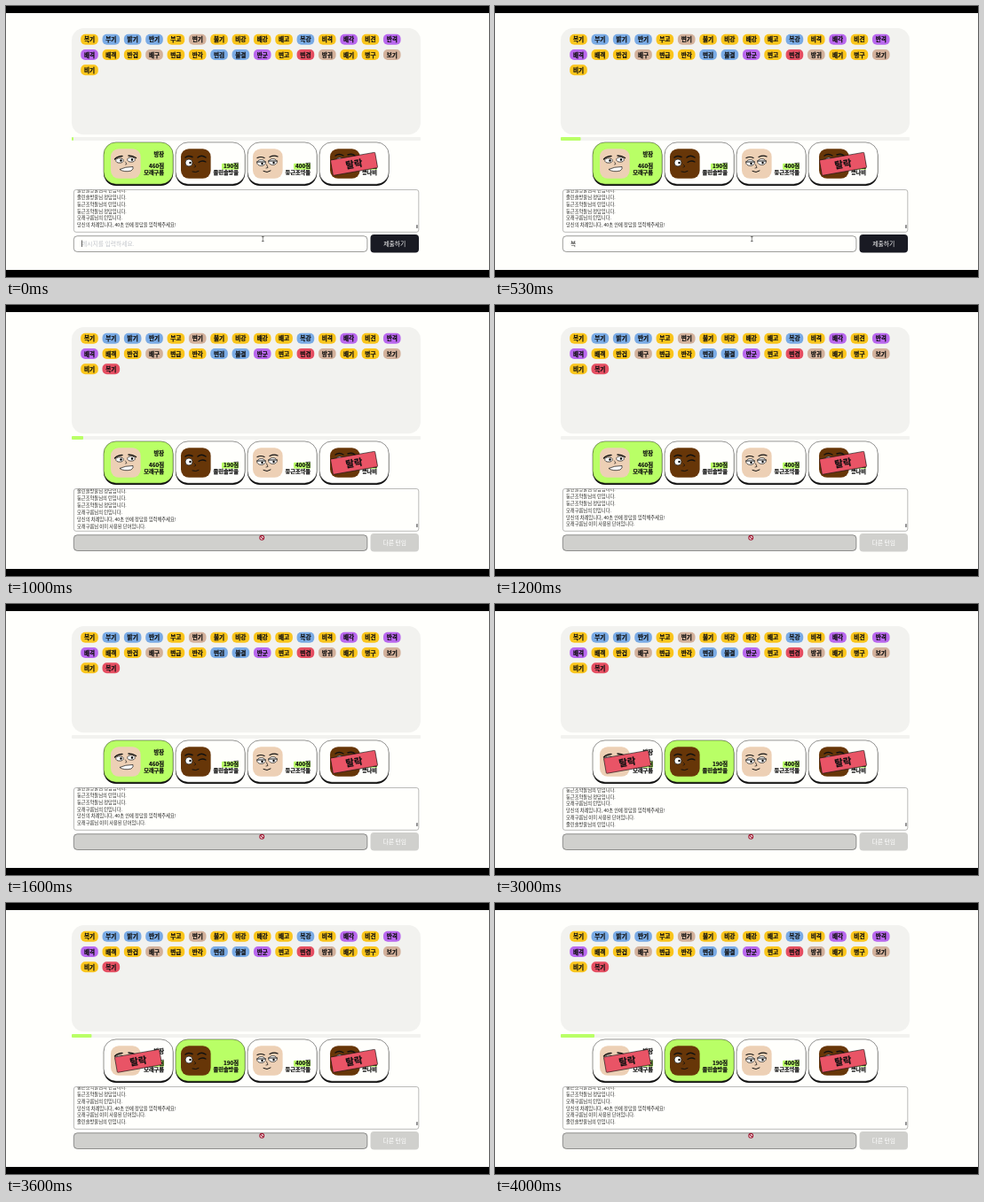
An HTML page that plays this animation: 544x306 px, repeating every 4.14 s.

```html
<!DOCTYPE html>
<html>
<head>
<meta charset="utf-8">
<style>
html, body { margin: 0; width: 100%; height: 100%; overflow: hidden; background: #000; }
svg { display: block; width: 544px; height: 306px; font-family: "Noto Sans CJK KR", "Noto Sans CJK JP", "Noto Sans CJK", sans-serif; }
.heavy { font-weight: 900; fill: #111; stroke: #111; stroke-width: .22; }
.ink { fill: none; stroke: #111; stroke-linecap: round; stroke-linejoin: round; }
.eye { fill: #fff; stroke: #111; stroke-width: .7; }
</style>
</head>
<body>
<svg id="stage" viewBox="0 0 544 306"></svg>
<script>
const LOOP = 4140, GREEN = '#b9ff66', PALE = '#f2f2ef', OFF = '#d0d0cd', PAPER = '#fffffc';
const COLORS = { y: '#fac51c', b: '#7aabe5', t: '#d3b19b', p: '#b968ee', r: '#e54f62' };
const WORDS = ('복기y 부기b 밝기b 반기b 부고y 변기t 불기y 비강y 배강y 배고y 복강b 비격y 배각p 비견y 반격p ' +
  '배격p 배객y 반겁y 배구t 변급y 반각y 변검b 불결b 반군p 변고y 변경r 방귀t 배기y 병구y 보기t 비기y 복기r').split(' ');
const PLAYERS = [
  { name: '모래구름', score: '460점', left: 118, right: 178, skin: '#edd0b5', host: true },
  { name: '졸린솔방울', score: '190점', left: 197, right: 262, skin: '#673608' },
  { name: '둥근조약돌', score: '400점', left: 278, right: 343, skin: '#edd0b5' },
  { name: '콩나비', score: '210점', left: 365, right: 418, skin: '#673608' }
];
const [A, B, C] = PLAYERS.map(p => p.name);
const turn = n => n + '님의 턴입니다.', right = n => n + '님 정답입니다.';
const MESSAGES = [turn(B), right(B), turn(C), right(C), turn(A),
  '당신의 차례입니다, 40초 안에 정답을 입력해주세요!', A + '님 이미 사용된 단어입니다.', turn(B)];
const TYPING = [[330, 'ㅂ'], [400, '보'], [530, '복'], [600, '복ㄱ'], [730, '복기']];

const rect = (x, y, w, h, r, fill, more = '') =>
  `<rect x="${x}" y="${y}" width="${w}" height="${h}" rx="${r}" fill="${fill}" ${more}/>`;
// Text is placed by the middle of its glyphs.
const text = (s, x, y, size, more = '') =>
  `<text x="${x}" y="${y + size * .38}" font-size="${size}" ${more}>${s}</text>`;
const ink = (d, w = 1) => `<path class="ink" d="${d}" stroke-width="${w}"/>`;
const eye = (x, y, rx, ry, px, py) =>
  `<ellipse class="eye" cx="${x}" cy="${y}" rx="${rx}" ry="${ry}"/><circle cx="${px}" cy="${py}" r="1.2"/>`;

// Faces are drawn on a 34 x 34 tile.
const FACES = [
  eye(10, 13.5, 4.2, 2.6, 11.5, 13.5) + eye(23, 12.5, 4.2, 2.6, 24, 12.5) +
    ink('M4.5 12Q8 8.5 13 8.5M20 8Q25 8 28.5 10.5', 1.4) + ink('M16.5 15L18 17.5L16.5 18', .6) +
    '<path class="eye" d="M10 23.5Q16 20.5 25 20.5Q26 23 23 25Q15 27 10 23.5Z"/>',
  eye(9, 16, 4, 4, 10.5, 16) + ink('M5 10Q8 7.5 13 9.5M19 10Q23 6.5 28 10', 1.5) +
    ink('M20 15.5Q24 12.8 28 15', 1.3) + ink('M15 18L17 20L15 21', .7) + ink('M13 26Q17 27.5 20 25.5', 1),
  eye(9.5, 16, 4.8, 3.4, 10.5, 17) + eye(22.5, 15, 4.8, 3.4, 23.5, 16) +
    ink('M4.7 15H14.3M17.7 14H27.3', 1.1) + ink('M5 10.5Q9 8.5 13 10.5M19 9.5Q24 7 28 9', 1.2) +
    ink('M15.5 18L17 21.5L15 22', .7) + ink('M12 25.5Q16 28 20 25', 1),
  eye(11, 13, 4, 3, 12, 13) + eye(24, 12, 4, 3, 25, 12) +
    ink('M6 8Q10 5 15 8M20 7Q25 5 28 8', 1.4) + ink('M13 25Q18 27 23 25', 1)
];

const chip = (word, i) => {
  const x = 94 + i % 15 * 24.34, y = 37.8 + Math.floor(i / 15) * 17.2;
  return `<g id="chip${i}">` + rect(x - 9.8, y - 6, 19.6, 12, 5, COLORS[word[2]]) +
    text(word.slice(0, 2), x, y, 6.6, 'class="heavy" text-anchor="middle"') + '</g>';
};

const card = (p, i) => {
  const x = 110 + i * 81, cx = x + 39;
  const label = (s, y, size) => text(s, p.right, y, size, 'class="heavy" text-anchor="end"');
  return rect(x, 155.5, 78.2, 47.5, 14, '#111') +
    rect(x, 153.9, 78.2, 47.3, 14, PAPER, `id="card${i}" stroke="#111" stroke-width=".45"`) +
    rect(p.left, 161.2, 33.6, 33.6, 9, p.skin) +
    `<g transform="translate(${p.left} 161)">${FACES[i]}</g>` +
    (p.host ? label('방장', 168, 6.3) : '') +
    rect(p.right - 19, 177.8, 19, 7, 1, GREEN) +
    label(p.score, 181.1, 6.3) + label(p.name, 188.1, 6.2) +
    `<g id="stamp${i}" transform="translate(${cx} 178.3) rotate(-10)" visibility="hidden">` +
    rect(-25.5, -8.8, 51, 17.6, 1, '#e95466', 'stroke="#111" stroke-width=".6"') +
    text('탈락', 0, 0, 10.3, 'class="heavy" text-anchor="middle"') + '</g>';
};

const stage = document.getElementById('stage');
stage.innerHTML =
  '<clipPath id="log"><rect x="76" y="207.8" width="389" height="47.2"/></clipPath>' +
  rect(0, 8, 544, 290, 0, PAPER) +
  rect(74, 25, 393, 120.3, 14, PALE) + WORDS.map(chip).join('') +
  rect(74, 148, 393, 4, 1, PALE) + rect(74, 148, 0, 4, 1, GREEN, 'id="bar"') +
  PLAYERS.map(card).join('') +
  rect(76.4, 207.5, 388.4, 47.8, 2.5, PAPER, 'stroke="#555" stroke-width=".4"') +
  '<g clip-path="url(#log)"><g id="lines" fill="#222" font-weight="500">' +
  MESSAGES.map((m, i) => text(m, 80, 247.3 + (i - 5) * 7.85, 5.25, `id="line${i}"`)).join('') + '</g></g>' +
  rect(462, 247, 1.8, 4, .4, '#888') +
  rect(76.3, 259.7, 330.6, 17.8, 4, PAPER, 'id="field" stroke="#222" stroke-width=".45"') +
  text('메시지를 입력하세요.', 85, 268.2, 6.8, 'id="hint" fill="#c3c6cc"') +
  rect(85, 264.5, .7, 7.5, 0, '#222', 'id="caret"') +
  text('', 85, 268.2, 6.8, 'id="typed" fill="#222"') +
  rect(410.5, 258, 54.5, 20.6, 4, '#191a23', 'id="button"') +
  text('', 437.7, 268.2, 6.8, 'id="action" fill="#fff" font-weight="500" text-anchor="middle"') +
  `<g id="beam">${ink('M288.3 260.6H290.3M289.3 260.6V265.6M288.3 265.6H290.3', .5)}</g>` +
  '<g id="blocked" fill="#fff" stroke="#a01c35" stroke-width="1.1"><circle cx="288.2" cy="262.8" r="2.4"/><path d="M286.5 261.1L289.9 264.5"/></g>';

const el = id => document.getElementById(id);
const show = (id, on) => el(id).setAttribute('visibility', on ? 'visible' : 'hidden');
const set = (id, key, value) => el(id).setAttribute(key, value);

function tick(t) {
  if (t >= 1600 && t < 3000) return 1600;
  const base = Math.floor(t / 200) * 200;
  return Math.min(4000, base + (t - base >= 130 ? 130 : 0));
}

function progress(t) {
  if (t < 1000) return 2 + t * .0387;
  if (t < 1200) return 13 * Math.exp((1000 - t) / 60);
  return Math.max(0, (t - 3025) * .039);
}

function draw(t) {
  const sent = t >= 1000, next = t >= 3000;
  const typed = TYPING.reduce((s, [at, word]) => t >= at ? word : s, '');
  const last = next ? 7 : sent ? 6 : 5;
  const slide = next ? 1.7 * Math.exp((3000 - t) / 70) : sent ? 2.3 * Math.exp((1000 - t) / 70) : 0;

  set('bar', 'width', progress(t));
  show('chip31', sent);
  PLAYERS.forEach((p, i) => {
    set('card' + i, 'fill', i === (next ? 1 : 0) ? GREEN : PAPER);
    show('stamp' + i, i === 3 || i === 0 && next);
  });
  set('lines', 'transform', `translate(0 ${(5 - last) * 7.85 + slide})`);
  MESSAGES.forEach((m, i) => show('line' + i, i <= last));
  set('field', 'fill', sent ? OFF : PAPER);
  show('hint', !typed);
  show('caret', !typed);
  el('typed').textContent = sent ? '' : typed;
  set('button', 'fill', sent ? OFF : '#191a23');
  el('action').textContent = sent ? '다른 턴임' : '제출하기';
  show('beam', t < 930);
  show('blocked', t >= 930);
}

const start = performance.now();
function frame() {
  draw(tick((performance.now() - start) % LOOP));
  requestAnimationFrame(frame);
}
frame();
</script>
</body>
</html>
```
